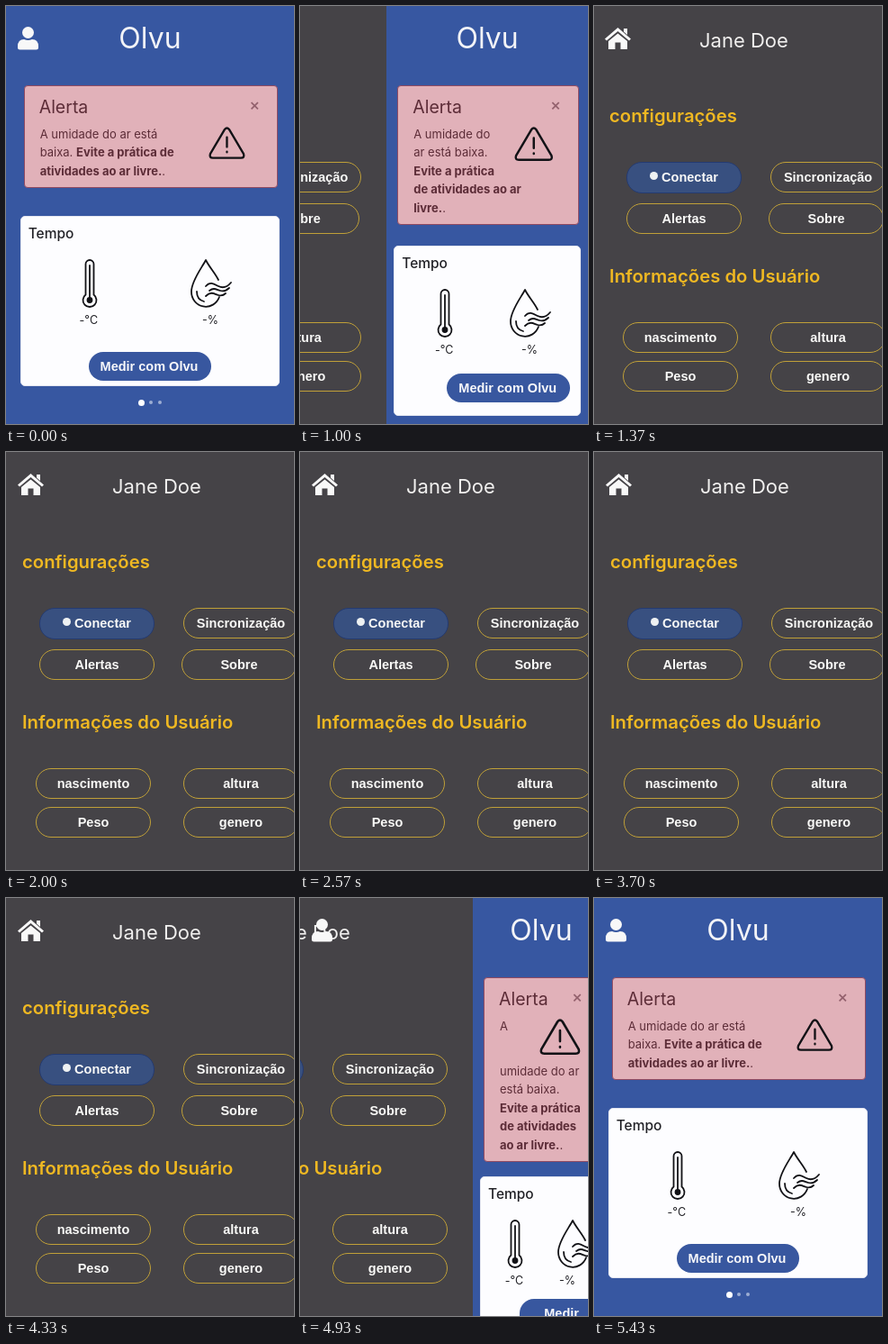
An HTML page for the animation above (5460 ms loop, 320 by 464 pixels).

```html
<!DOCTYPE html>
<html lang="pt">
<head>
<meta charset="utf-8">
<style>
  html, body { margin: 0; width: 100%; height: 100%; overflow: hidden; }
  * { box-sizing: border-box; }
  body { position: relative; background: #3757a1; font-family: Inter, sans-serif; }
  svg { position: absolute; fill: none; stroke: #121216; stroke-width: 1.8; stroke-linecap: round; stroke-linejoin: round; overflow: visible; }
  .icon { fill: #f8f8f8; stroke: none; }

  #main { position: absolute; top: 0; left: var(--x); width: var(--w); --card: calc(var(--w) - 2 * var(--pad)); --box: calc(var(--card) - 6px); }
  h1 { position: absolute; top: 16px; width: 100%; margin: 0; text-align: center; font: 400 32px/40px Inter, sans-serif; color: #f2f3f7; }

  #alert { position: absolute; top: 88px; left: calc(var(--pad) + 4px); width: var(--box); padding: 42.5px calc(var(--box) * .127 + 1px) 8px 17px;
    background: #e1b1b9; border: 1px solid #8f4a62; border-radius: 4px; color: #5c2c37; font-size: 13px; line-height: 20.5px; }
  #alert h2 { position: absolute; left: 16px; top: 10px; margin: 0; font: 400 19.5px/26px Inter, sans-serif; }
  #alert i { position: absolute; right: 17px; top: 10px; width: 16px; text-align: center; font: 500 18px/22px Inter, sans-serif; color: #93616d; }
  #alert svg { --size: calc(50px - var(--box) * .032); top: 45px; width: var(--size); right: calc(34px + var(--box) * .077 - var(--size) / 2); stroke-width: 2.4; }
  #gap { float: right; height: 50px; width: calc(41.6px + var(--box) * .095); }

  #weather { position: absolute; left: var(--pad); width: var(--card); height: 189px; background: #fdfdff; border: 1px solid #e4e6f0; border-radius: 5px; color: #212126; }
  #weather > * { position: absolute; }
  #weather h3 { left: 8px; top: 9px; margin: 0; font: 500 15.5px/20px Inter, sans-serif; }
  #weather span { top: 106px; width: 40px; margin-left: -21px; text-align: center; font-size: 12.5px; line-height: 18px; }
  #weather { --a: calc(var(--card) * .25 + 4px); --b: calc(var(--card) * .75 - 5px); }
  #temp { left: calc(var(--a) - 9px); top: 47px; }
  #drop { left: calc(var(--b) - 23px + max(0px, (207px - var(--card)) * .15)); top: 47px; }
  #measure { left: calc(15px + var(--card) * .2075); right: -4px; top: calc(120.4px + var(--w) * .0925); width: fit-content; padding: 8px 15px 8px 13px; border-radius: 16px;
    background: #38579f; color: #f8f8fa; text-align: center; font: bold 14.5px/16px "Liberation Sans", Arial, sans-serif; }
  #weather .dot { top: 204px; left: 50%; width: 4px; height: 4px; border-radius: 50%; background: #9cadd2; }

  #side { position: absolute; top: 0; left: calc(var(--x) - 353px); width: 353px; height: 464px; background: #454347; }
  #side > * { position: absolute; white-space: nowrap; }
  #side h2 { left: 118px; top: 23px; margin: 0; font: 400 22px/30px Inter, sans-serif; color: #f1f0ef; }
  #side h3 { left: 18px; margin: 0; font: 600 20.3px/28px Inter, sans-serif; color: #efb822; }
  .pill { width: 128px; height: 34px; border: 1px solid #c0a038; border-radius: 17px; text-align: center; color: #f9f9f7; font: bold 14.5px/32px "Liberation Sans", Arial, sans-serif; }
  .pill.on { height: 35px; background: #385080; border-color: #243a70; padding-left: 13px; }
  .pill.on::before { content: ""; position: absolute; left: 25px; top: 10px; width: 9px; height: 9px; border-radius: 50%; background: #eef1f2; }
</style>
</head>
<body>
<div id="main">
  <h1>Olvu</h1>
  <div id="alert">
    <h2>Alerta</h2><i>×</i>
    <svg viewBox="0 0 42 37"><path d="M18.5 3Q21 0 23.500 3L40 31Q41.500 35.500 37 35.500H5Q.5 35.500 2 31ZM21 12V23M21 28.500V29"/></svg>
    <div id="gap"></div>A umidade do ar está baixa. <b>Evite a prática de atividades ao ar livre.</b>.
  </div>
  <div id="weather">
    <h3>Tempo</h3>
    <svg id="temp" width="18" height="54"><path d="M4.500 39.500V5.500a4.500 4.500 0 0 1 9 0V39.500a7.500 7.500 0 1 1-9 0ZM9 7V44"/><circle cx="9" cy="45.500" r="2.500" fill="#121216"/></svg>
    <span style="left:var(--a)">-°C</span>
    <svg id="drop" width="46" height="54"><path d="M31 23C27 15 21 9 17 1C13 9 1 24 1 36A16 16.500 0 0 0 32 42M7 36Q7 45 15 47M17 30C22 24 27 28 31 30S40 32 45 26M21 35C26 31 29 34 33 35S40 35 43 32M17 41C23 35 27 39 31 40S37 40 39 38"/></svg>
    <span style="left:var(--b)">-%</span>
    <div id="measure">Medir com Olvu</div>
    <div class="dot" style="margin:-1px 0 0 -13px;width:7px;height:7px;background:#fff"></div>
    <div class="dot" style="margin-left:-1px"></div>
    <div class="dot" style="margin-left:9px"></div>
  </div>
</div>
<div id="side">
  <svg class="icon" style="left:13px;top:23px" width="29" height="25"><path d="M14.500 1L29 13.500L27 15.500L14.500 5L2 15.500L0 13.500ZM21 2H25V9L21 5.500ZM14.500 7.500L25 16V25H17.500V17.500H11.500V25H4V16Z"/></svg>
  <h2>Jane Doe</h2>
  <h3 style="top:108px">configurações</h3>
  <h3 style="top:286px">Informações do Usuário</h3>
</div>
<svg id="user" class="icon" style="left:13px;top:23px" width="23" height="26"><circle cx="11.500" cy="6.500" r="6.500"/><path d="M0 22Q0 14 7 14Q11.500 16 16 14Q23 14 23 22V23Q23 25.500 20.500 25.500H2.500Q0 25.500 0 23Z"/></svg>
<script>
const LOOP = 5460, OPEN = 906, CLOSE = 4795, SLIDE = 500, SIDE = 353;
const weather = document.getElementById('weather');
const alertBox = document.getElementById('alert');
const side = document.getElementById('side');
const user = document.getElementById('user');

const pills = [
  ['Conectar', 37, 173], ['Sincronização', 197, 173],
  ['Alertas', 37, 219], ['Sobre', 195, 219],
  ['nascimento', 33, 351], ['altura', 197, 351],
  ['Peso', 33, 394], ['genero', 197, 394]
];
pills.forEach(([text, left, top], i) => {
  const pill = document.createElement('div');
  pill.className = i ? 'pill' : 'pill on';
  pill.textContent = text;
  pill.style.cssText = `left:${left}px;top:${top}px`;
  side.append(pill);
});

const clamp = v => Math.min(1, Math.max(0, v));
const bezier = (a, b, s) => 3 * a * s * (1 - s) ** 2 + 3 * b * s * s * (1 - s) + s ** 3;

// CSS "ease", solved by bisection
function ease(t) {
  let low = 0, high = 1;
  for (let i = 0; i < 20; i++) {
    const mid = (low + high) / 2;
    if (bezier(.25, .25, mid) < t) low = mid; else high = mid;
  }
  return bezier(.1, 1, low);
}

function draw(now) {
  const t = now % LOOP;
  const slide = start => ease(clamp((t - start) / SLIDE));
  const x = SIDE * (slide(OPEN) - slide(CLOSE));
  const w = Math.max(152, 320 - x);
  const vars = { x, w, pad: 8 + 7.7 * clamp((w - 223) / 97) };
  for (const key in vars) document.body.style.setProperty('--' + key, vars[key].toFixed(2) + 'px');
  weather.style.top = 88 + alertBox.offsetHeight + 3 + .0875 * w + 'px';
  user.style.display = t < OPEN || t >= CLOSE ? '' : 'none';
  requestAnimationFrame(draw);
}
requestAnimationFrame(draw);
</script>
</body>
</html>
```
